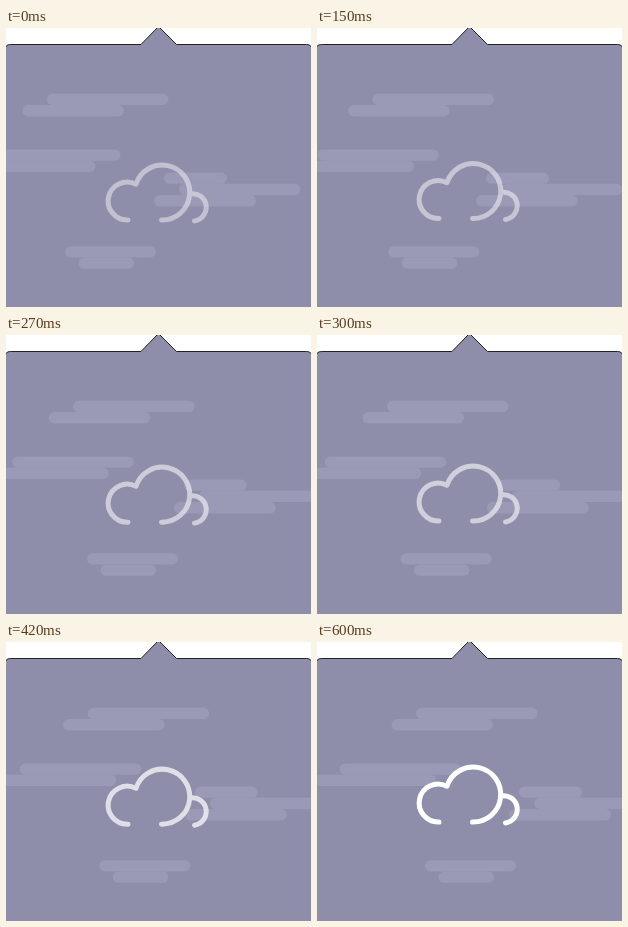
Recreate the animation shown at these times as an HTML page. Size 305 px wide and 279 px high, loop 1.17 s.

```html
<!DOCTYPE html>
<html lang="en">
<head>
<meta charset="utf-8">
<title>Drifting clouds</title>
<style>
html, body { margin: 0; width: 100%; height: 100%; overflow: hidden; background: #fff; }
svg { display: block; width: 305px; height: 279px; }
</style>
</head>
<body>
<svg viewBox="0 0 305 279">
  <path d="M-1 300V22Q-1 16.5 4.5 16.5H135L152.5 -1.5L170.5 16.5H300.5Q306 16.5 306 22V300Z" fill="#8e8eaa" stroke="#222" stroke-width="1"/>
  <g id="wind" fill="#9a9ab6"></g>
  <g id="cloud" fill="none" stroke="#fff" stroke-width="5" stroke-linecap="round" stroke-linejoin="round">
    <path d="M122 180A19 19 0 1 1 130 144.200A27.500 27.500 0 1 1 155.500 180"/>
    <path d="M184.500 153.800A13.700 13.700 0 1 1 188.500 181"/>
  </g>
</svg>
<script>
const LOOP = 1170, MOVE = 600, HOLD = 90, STEP = 30;
const BAR = 11.3;

// Each gust: total drift, then bars as [x, y, width]
const gusts = [
  { drift: 58, bars: [[41, 65.8, 121.5], [16.5, 77.1, 101.5]] },
  { drift: 29.5, bars: [[-7, 121.4, 121.5], [-32, 132.7, 121.5]] },
  { drift: 44, bars: [[158, 144.5, 63], [173, 155.800, 121.5], [148, 167.1, 102]] },
  { drift: 49, bars: [[59, 218.2, 91], [72.5, 229.5, 55.5]] }
];

const cloud = document.getElementById('cloud');
const wind = document.getElementById('wind');

function add(parent, name, attrs = {}) {
  const el = document.createElementNS('http://www.w3.org/2000/svg', name);
  for (const key in attrs) el.setAttribute(key, attrs[key]);
  return parent.appendChild(el);
}

for (const gust of gusts) {
  gust.el = add(wind, 'g');
  for (const [x, y, width] of gust.bars) {
    add(gust.el, 'rect', { x, y, width, height: BAR, rx: BAR / 2 });
  }
}

const easeInOut = p => p < 0.5 ? 2 * p * p : 1 - 2 * (1 - p) ** 2;

function draw(time) {
  const t = time % LOOP;
  const held = t < HOLD ? 0 : Math.min(MOVE, Math.floor(t / STEP) * STEP);
  const p = held / MOVE;
  for (const { el, drift } of gusts) {
    el.setAttribute('transform', `translate(${drift * p} 0)`);
  }
  cloud.setAttribute('transform', `translate(0 ${12 * (1 - easeInOut(p))})`);
  cloud.setAttribute('opacity', 0.45 + 0.55 * p ** 2);
}

let start;
function tick(now) {
  start ??= now;
  draw(now - start);
  requestAnimationFrame(tick);
}
draw(0);
requestAnimationFrame(tick);
</script>
</body>
</html>
```
